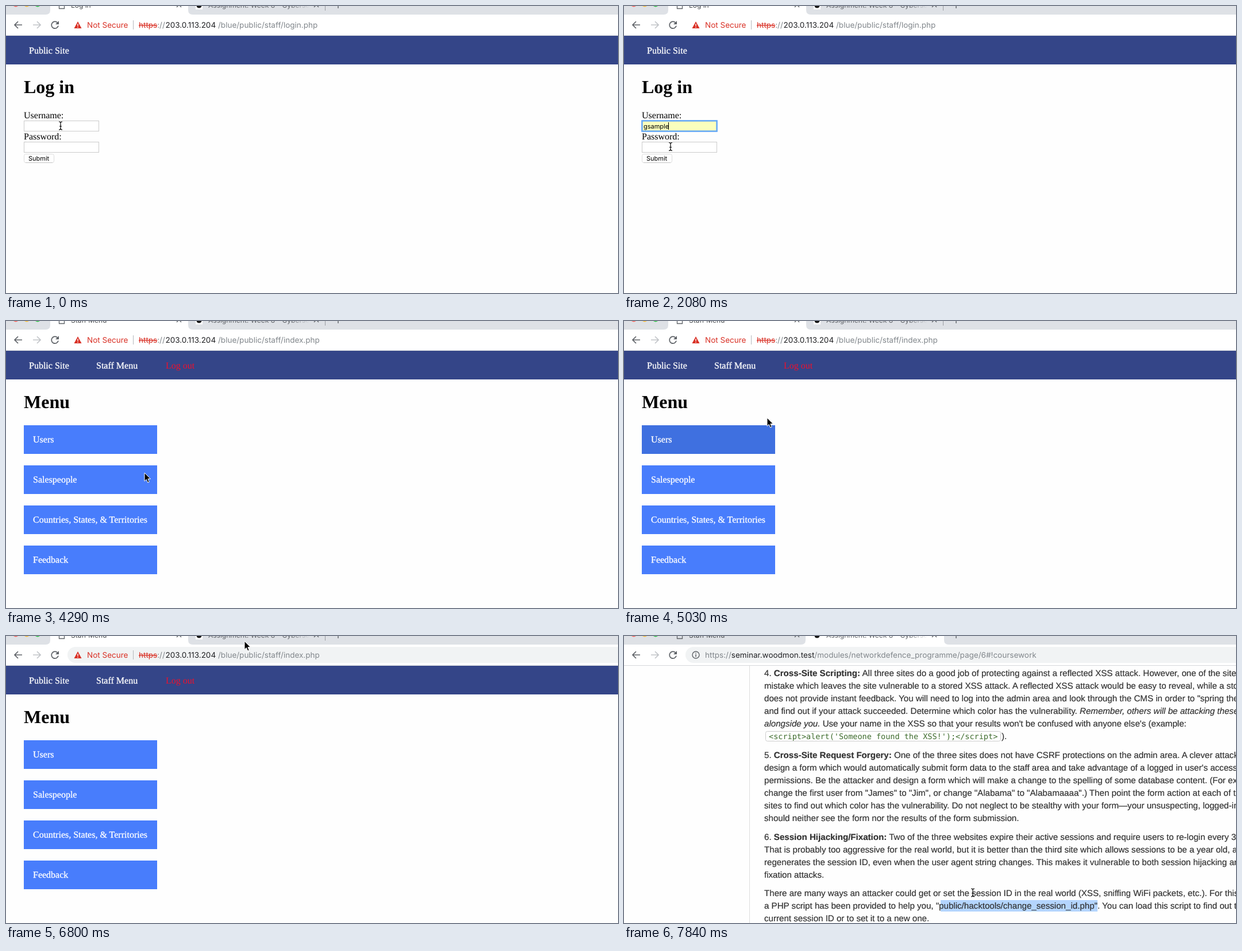
An HTML page for the animation above (7.99 s loop, 1065 px wide and 501 px high).

```html
<!DOCTYPE html>
<html lang="en">
<head>
<meta charset="utf-8">
<title>Log in</title>
<style>
  html, body { margin: 0; width: 100%; height: 100%; overflow: hidden; background: #fefefe; }
  svg { display: block; width: 100vw; height: 100vh; text-rendering: geometricPrecision; }
  .ui { font-family: Inter, Roboto, sans-serif; }
  .tab { font-size: 12px; fill: #4a4e52; }
  .url { font-size: 13.5px; fill: #80868b; }
  .url .host { fill: #202124; }
  .red { fill: #d93025; }
  .site { font: 16px "Liberation Serif", serif; }
  .head { font-size: 32px; font-weight: bold; }
  .white { fill: #fff; stroke: #fff; stroke-width: .3; }
  .field { font-size: 11px; }
  .list { font-size: 12.7px; fill: #202124; }
  .box { fill: #fff; stroke: #ccc; }
  .box.filled { fill: #faffbd; stroke: #a2a2a2; }
  .box.focus { stroke: #68aaf5; stroke-width: 2.4; filter: drop-shadow(0 0 .7px #68aaf5); }
  .popup { fill: #fff; filter: drop-shadow(0 1px 1.5px #0007); }
  .button { fill: #487dfc; }
  .button.hover { fill: #3f70e0; }
  .doc { font: 15.12px "Liberation Sans", sans-serif; fill: #333; }
  .doc text { stroke: #333; stroke-width: .2; }
  .doc .b { font-weight: bold; }
  .doc .i { font-style: italic; }
  .doc .code { font: 13.5px "DejaVu Sans Mono", monospace; fill: #3d6b2c; stroke: none; }
  .line { fill: none; stroke: #5f6368; stroke-width: 1.7; }
</style>
</head>
<body>
<svg viewBox="0 0 1065 501">
  <defs>
    <linearGradient id="fade" gradientUnits="userSpaceOnUse" x1="495" x2="528" y1="0" y2="0">
      <stop stop-color="#5f6368"/><stop offset="1" stop-color="#5f6368" stop-opacity="0"/>
    </linearGradient>
  </defs>
  <rect width="1065" height="501" fill="#fefefe"/>

  <!-- browser frame -->
  <g class="ui">
    <rect width="1065" height="51" fill="#fff"/>
    <g fill="#dee1e6">
      <g id="firstTab">
        <path d="M0 0H77V7Q77 15 69 15H0Z"/>
        <path d="M317 0H1065V15H325Q317 15 317 7Z"/>
        <path d="M555.5 0V8" stroke="#999da2"/>
      </g>
      <g id="secondTab">
        <path d="M0 0H316V7Q316 15 308 15H0Z"/>
        <path d="M557 0H1065V15H565Q557 15 557 7Z"/>
      </g>
    </g>
    <circle cx="17" cy="-4.5" r="6" fill="#ff5f57"/>
    <circle cx="36" cy="-4.5" r="6" fill="#ffbd2e"/>
    <circle cx="55" cy="-4.5" r="6" fill="#28c940"/>
    <path id="pageIcon" d="M92.5 -8V4.5H101.5V-8" class="line" style="stroke-width:1.3"/>
    <path id="spinner" d="M91 -2A6 6 0 0 0 103 -2" class="line"/>
    <text id="tabTitle" class="tab" x="113" y="2.5"></text>
    <path d="M297 2L305 -6M297 -6L305 2M536 2L544 -6M536 -6L544 2M578 -8V4M573 -1.5H583" class="line" style="stroke-width:1.4"/>
    <rect x="330" y="-6" width="12" height="12" fill="#fff"/>
    <circle cx="336" cy="-1" r="4.5" fill="#111"/>
    <text class="tab" x="352" y="2.5" style="fill:url(#fade)">Assignment: Week 8 - Cyberse</text>

    <rect id="pill" x="107" y="19" width="980" height="28" rx="14" fill="#f1f3f4"/>
    <path d="M28 33H15M21 27L15 33L21 39" class="line"/>
    <path d="M47 33H60M54 27L60 33L54 39" class="line" style="stroke:#c1c4c8"/>
    <g id="reload">
      <path d="M89.5 29A6 6 0 1 0 91 34.5" class="line"/>
      <path d="M92 26V32H86Z" fill="#5f6368"/>
    </g>
    <path id="stop" d="M80 28L90 38M90 28L80 38" class="line"/>

    <g id="siteUrl" class="url">
      <path class="red" d="M125 27L131.5 39H118.5Z"/>
      <path d="M125 31V35M125 36.3V37.7" stroke="#fff" stroke-width="1.4"/>
      <text class="red" x="141" y="38">Not Secure</text>
      <path d="M221.5 25V41" stroke="#b5b8bc"/>
      <text x="231" y="38"><tspan class="red" text-decoration="line-through">https</tspan>://</text>
      <text class="host" x="277.5" y="38">203.0.113.204</text>
      <text id="path" x="369" y="38"></text>
    </g>
    <g id="docUrl" class="url">
      <circle cx="125" cy="33" r="6" class="line" style="stroke-width:1.4"/>
      <path d="M125 32V36.5M125 29.3V30.8" class="line" style="stroke-width:1.5"/>
      <text x="141" y="38">https://<tspan class="host">seminar.woodmon.test</tspan>/modules/networkdefence_programme/page/6#!coursework</text>
    </g>
    <path d="M0 51.5H1065" stroke="#d5d7da"/>
  </g>

  <g id="sitePage" class="site">
    <rect y="52" width="1065" height="50" fill="#344588"/>
    <text class="white" x="40" y="83">Public Site</text>

    <g id="login">
      <text class="head" x="31" y="152">Log in</text>
      <text x="31" y="196">Username:</text>
      <text x="31" y="233">Password:</text>
      <rect id="user" class="box" x="31.5" y="200.5" width="130" height="18"/>
      <rect id="pass" class="box" x="31.5" y="237.5" width="130" height="18"/>
      <rect x="31.5" y="258.5" width="52" height="15" rx="3" fill="#fff" stroke="#dcdcdc"/>
      <path d="M34 273.5H81" stroke="#c4c4c4"/>
      <g class="ui field">
        <text x="39" y="270">Submit</text>
        <text id="userText" x="34" y="213.5">gsample</text>
      </g>
      <path id="dots" d="M37 247.5H93.5" stroke="#000" stroke-width="4" stroke-linecap="round" stroke-dasharray="0 5.1"/>
      <path id="caret" stroke="#000"/>
      <g id="popup" class="ui list">
        <path class="popup" d="M31 220H223V412Q223 416 219 416H35Q31 416 31 412Z"/>
        <rect id="choice" x="31" y="228" width="192" height="36" fill="#e8eaed"/>
        <text x="43" y="251">gsample</text>
        <text x="43" y="287">admin</text>
        <text x="43" y="323">user</text>
        <text x="43" y="359">samondan5@gromo.test</text>
        <text x="43" y="395">NewKey</text>
      </g>
    </g>

    <g id="menu">
      <text class="white" x="157" y="83">Staff Menu</text>
      <text x="278" y="83" fill="#f0102c">Log out</text>
      <text class="head" x="31" y="152">Menu</text>
    </g>
  </g>

  <g id="docPage" class="doc">
    <path d="M218.5 52V501" stroke="#ddd"/>
    <rect x="551" y="461" width="273" height="20" fill="#b4d5fe"/>
    <rect x="246.5" y="166.5" width="409" height="17" rx="3" fill="#fff" stroke="#ccc"/>
    <text class="code" x="252" y="180">&lt;script&gt;alert('Someone found the XSS!');&lt;/script&gt;</text>
    <text x="657" y="180">).</text>
    <g id="lines">
      <text y="70">4. <tspan class="b">Cross-Site Scripting:</tspan> All three sites do a good job of protecting against a reflected XSS attack. However, one of the sites has a</text>
      <text y="92">mistake which leaves the site vulnerable to a stored XSS attack. A reflected XSS attack would be easy to reveal, while a stored attack</text>
      <text y="114">does not provide instant feedback. You will need to log into the admin area and look through the CMS in order to "spring the trap"</text>
      <text y="136">and find out if your attack succeeded. Determine which color has the vulnerability. <tspan class="i">Remember, others will be attacking these sites</tspan></text>
      <text y="158"><tspan class="i">alongside you.</tspan> Use your name in the XSS so that your results won't be confused with anyone else's (example:</text>
      <text y="213">5. <tspan class="b">Cross-Site Request Forgery:</tspan> One of the three sites does not have CSRF protections on the admin area. A clever attacker could</text>
      <text y="235">design a form which would automatically submit form data to the staff area and take advantage of a logged in user's access</text>
      <text y="257">permissions. Be the attacker and design a form which will make a change to the spelling of some database content. (For example,</text>
      <text y="279">change the first user from "James" to "Jim", or change "Alabama" to "Alabamaaaa".) Then point the form action at each of the</text>
      <text y="301">sites to find out which color has the vulnerability. Do not neglect to be stealthy with your form—your unsuspecting, logged-in</text>
      <text y="323">should neither see the form nor the results of the form submission.</text>
      <text y="356">6. <tspan class="b">Session Hijacking/Fixation:</tspan> Two of the three websites expire their active sessions and require users to re-login every 30 minutes.</text>
      <text y="378">That is probably too aggressive for the real world, but it is better than the third site which allows sessions to be a year old, and</text>
      <text y="400">regenerates the session ID, even when the user agent string changes. This makes it vulnerable to both session hijacking and</text>
      <text y="422">fixation attacks.</text>
      <text y="454">There are many ways an attacker could get or set the session ID in the real world (XSS, sniffing WiFi packets, etc.). For this task</text>
      <text y="476">a PHP script has been provided to help you, "public/hacktools/change_session_id.php". You can load this script to find out the</text>
      <text y="498">current session ID or to set it to a new one.</text>
    </g>
  </g>

  <g id="cursor">
    <path id="arrow" d="M0 0V14.5L3.3 11.5L5.7 17L8.2 16L5.9 10.6H10.4Z" stroke="#fff"/>
    <g id="beam" fill="none">
      <path d="M-3 -7Q0 -7 0 -5V5Q0 7 -3 7M3 -7Q0 -7 0 -5M0 5Q0 7 3 7M-2 1H2" stroke="#fff" stroke-width="2.6" stroke-opacity=".6"/>
      <path d="M-3 -7Q0 -7 0 -5V5Q0 7 -3 7M3 -7Q0 -7 0 -5M0 5Q0 7 3 7M-2 1H2" stroke="#000" stroke-width="1.2"/>
    </g>
  </g>
</svg>
<script>
const LOOP = 7990, TICK = 147.6, LAST = 53;
const $ = id => document.getElementById(id);
const show = (id, on) => { $(id).style.display = on ? '' : 'none'; };
const within = (k, from, to) => k >= from && k < to;

// cursor waypoints: tick, x, y
const route = [
  [5, 95, 209], [9, 88, 244], [11, 88, 244], [17, 74, 247], [20, 74, 247],
  [21, 76, 256], [23, 70, 264], [24, 70, 264], [28, 241, 265], [31, 241, 265],
  [34, 249, 169], [38, 275, 38], [41, 330, 33], [45, 414, 30], [46, 415, 9],
  [47, 415, 8], [50, 225, 250], [53, 607, 448]
];

function cursorAt(k) {
  const i = route.findIndex(p => p[0] >= k);
  if (i <= 0) return route[0].slice(1);
  const [t0, x0, y0] = route[i - 1], [t1, x1, y1] = route[i];
  const f = (k - t0) / (t1 - t0);
  return [x0 + (x1 - x0) * f, y0 + (y1 - y0) * f];
}

const buttons = ['Users', 'Salespeople', 'Countries, States, & Territories', 'Feedback'].map((label, i) => {
  const add = (tag, attrs) => {
    const el = document.createElementNS($('menu').namespaceURI, tag);
    for (const name in attrs) el.setAttribute(name, attrs[name]);
    return $('menu').appendChild(el);
  };
  const rect = add('rect', { class: 'button', x: 31, y: 182 + 70 * i, width: 232, height: 50 });
  add('text', { class: 'white', x: 47, y: 212 + 70 * i }).textContent = label;
  return rect;
});
for (const line of $('lines').children) line.setAttribute('x', 244);

function draw(k) {
  const onMenu = k >= 29, onDoc = k >= 47, loading = within(k, 24, 29);
  show('firstTab', !onDoc);
  show('secondTab', onDoc);
  show('siteUrl', !onDoc);
  show('docUrl', onDoc);
  show('sitePage', !onDoc);
  show('docPage', onDoc);
  show('login', !onMenu);
  show('menu', onMenu);
  show('pageIcon', !loading);
  show('spinner', loading);
  show('reload', !loading);
  show('stop', loading);
  show('pill', k >= 38);
  $('tabTitle').textContent = onMenu ? 'Staff Menu' : 'Log in';
  $('path').textContent = '/blue/public/staff/' + (onMenu ? 'index.php' : 'login.php');

  const userFocus = within(k, 4, 17), passFocus = within(k, 17, 24);
  $('user').classList.toggle('filled', k >= 8);
  $('user').classList.toggle('focus', userFocus);
  $('pass').classList.toggle('focus', passFocus);
  show('userText', k >= 8);
  show('popup', within(k, 4, 11));
  show('choice', k >= 8);
  show('dots', k >= 19);
  show('caret', userFocus || passFocus);
  const caretX = k >= 19 ? 95.5 : k >= 11 && userFocus ? 77.5 : 34.5;
  $('caret').setAttribute('d', `M${caretX} ${userFocus ? 203 : 240}v13`);

  buttons[0].classList.toggle('hover', within(k, 33, 35));
  buttons[1].classList.toggle('hover', within(k, 30, 33));

  const beam = k < 22 || within(k, 38, 46) || k >= 51;
  show('beam', beam);
  show('arrow', !beam);
  show('cursor', !within(k, 19, 21));
  $('cursor').setAttribute('transform', `translate(${cursorAt(k)})`);
}

let shown = -1;
function frame() {
  const t = performance.now() % LOOP;
  const k = Math.min(LAST, Math.max(0, Math.floor((t - 5) / TICK)));
  if (k !== shown) draw(shown = k);
  requestAnimationFrame(frame);
}
frame();
</script>
</body>
</html>
```
